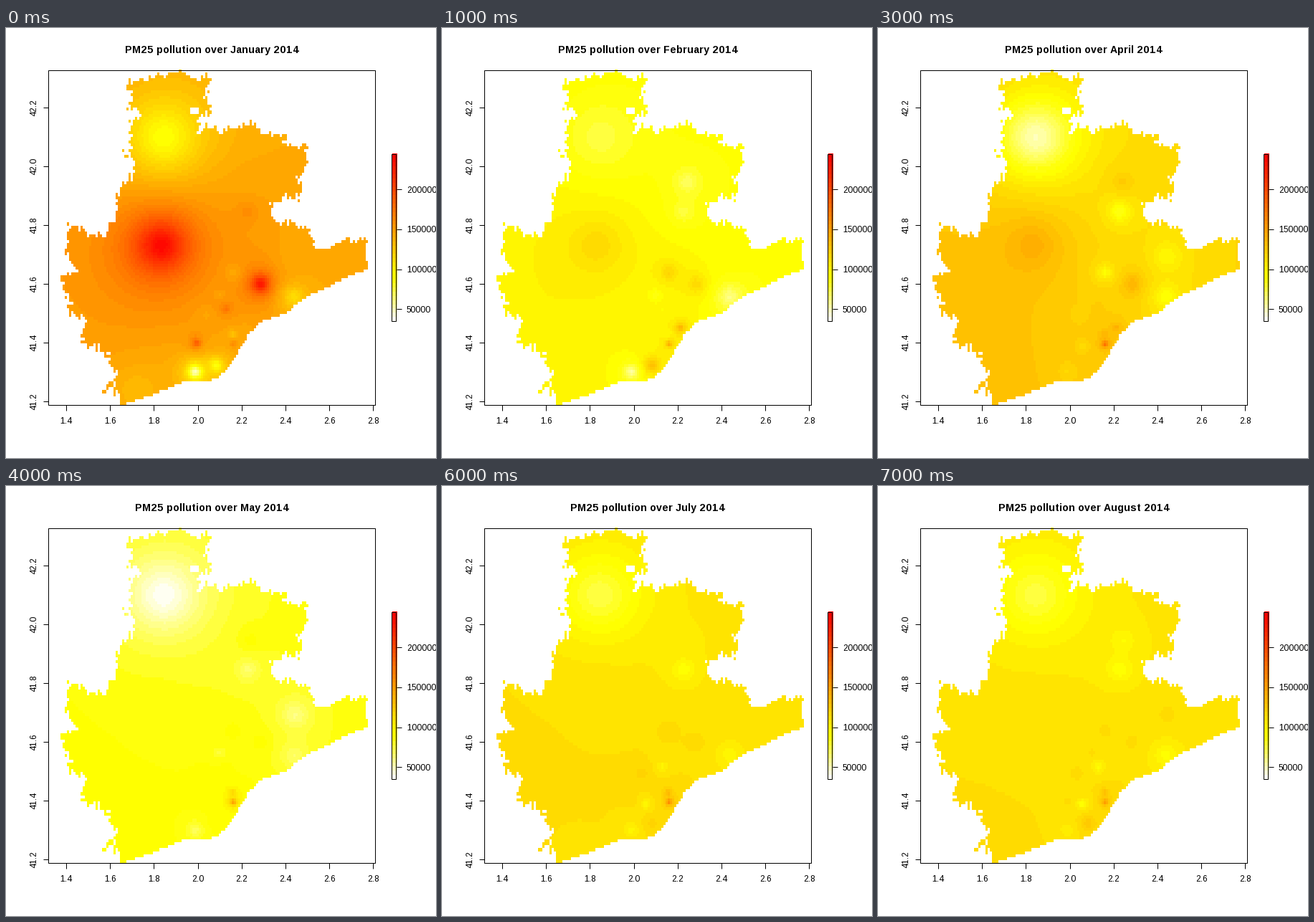
Write a matplotlib script that moves like this. It is 600 px wide and 600 px high and loops after 8000 ms.

```python
import colorsys
import numpy as np
import matplotlib.pyplot as plt
from matplotlib.animation import FuncAnimation
from matplotlib.path import Path
from matplotlib.patches import Rectangle

SIZE = 600
PX = 0.72                             # points per pixel at 100 dpi
LOW, HIGH, LEVELS = 34.7, 244.4, 40   # thousands
COLS, ROWS = 140, 114
LEFT, TOP, CELL_W, CELL_H = 76.35, 59.04, 3.06, 4.1
MONTHS = ["January", "February", "March", "April",
          "May", "June", "July", "August"]

# Key points of the province outline, clockwise, in stage pixels
NORTH = [
    (169, 75), (205, 71), (230, 64), (252, 64), (262, 70), (287, 68),
    (284, 88), (275, 92), (286, 108), (286, 122), (270, 122), (270, 149),
    (278, 137), (300, 145), (337, 136), (346, 133), (358, 149), (390, 148),
    (390, 166), (418, 163), (422, 186), (416, 207), (402, 209), (413, 216),
    (413, 231), (402, 234), (410, 241), (386, 236), (367, 249), (376, 273),
    (403, 273), (424, 283), (431, 309),
]
COAST = [
    (452, 308), (467, 297), (504, 299), (501, 310), (505, 337), (480, 347),
    (425, 373), (385, 401), (355, 411), (340, 426), (312, 473), (296, 488),
    (284, 493), (249, 493), (227, 504), (160, 527),
]
WEST = [
    (158, 510), (137, 505), (137, 497), (154, 499), (152, 483), (145, 472),
    (145, 457), (121, 442), (107, 446), (110, 405), (82, 394), (91, 385),
    (80, 366), (77, 347), (97, 340), (95, 322), (82, 314), (90, 277),
    (106, 279), (110, 288), (143, 287), (154, 262), (154, 241), (138, 241),
    (159, 234), (159, 220), (180, 205), (180, 180), (163, 178), (173, 172),
    (174, 129), (185, 125), (186, 112), (172, 112), (178, 96),
]
GAP = Path([(258, 112), (269, 112), (269, 121), (258, 121)])

SITES = dict(
    north=(220, 153), centre=(217, 304), ridge=(342, 216), valley=(337, 257),
    east=(355, 358), moor=(403, 320), shore=(401, 376), mill=(317, 342),
    park=(307, 392), hill=(298, 373), west=(279, 401), bridge=(266, 440),
    field=(285, 444), port=(317, 441), beach=(333, 419), delta=(264, 480),
    quay=(293, 471), cove=(182, 506), square=(316, 428))

# Background in the west and east, then the sites that stand out from it
READINGS = {
    "January": (146, 141, dict(
        north=88, centre=238, east=230, valley=158, park=172, bridge=190,
        shore=110, delta=46, quay=85, port=160, square=118, cove=130)),
    "February": (96, 90, dict(
        north=74, centre=112, ridge=66, valley=74, mill=114, east=112,
        shore=60, hill=82, beach=135, port=140, delta=55, quay=128)),
    "March": (166, 146, dict(
        north=64, centre=192, valley=100, mill=92, east=180, moor=125,
        shore=108, west=140, field=124, port=206, beach=184)),
    "May": (92, 89, dict(
        north=36, centre=83, valley=64, moor=60, shore=66, hill=74,
        port=152, square=118, delta=68)),
    "June": (119, 113, dict(
        north=68, ridge=128, valley=92, moor=87, hill=98, west=150,
        port=196, square=150, delta=84, quay=88, cove=90)),
    "August": (110, 109, dict(
        north=74, centre=104, valley=87, ridge=92, shore=90, park=90,
        field=86, port=154, square=130, quay=122, delta=98)),
}
BLENDS = {"April": ("March", "May", 0.5), "July": ("June", "August", 0.8)}


def heat_palette(n):
    """White through yellow to red; the lowest quarter fades to white."""
    pale = n // 4
    warm = n - pale
    hues = [colorsys.hsv_to_rgb(k / (warm - 1) / 6, 1, 1) for k in range(warm)]
    fade = np.linspace(1 - 0.5 / pale, 0.5 / pale, pale)
    return np.array((hues + [(1, 1, 1 - s) for s in fade])[::-1])


def province_mask(cells):
    """Cells inside the outline, with a ragged edge everywhere but the coast."""
    rng = np.random.default_rng(4)
    shift_x = np.repeat(rng.choice([-CELL_W, 0, 0, CELL_W], ROWS), COLS)
    shift_y = np.tile(rng.choice([-CELL_H, 0, 0, CELL_H], COLS), ROWS)
    inland = (cells[:, 0] < 155) | (cells[:, 1] < 300)
    ragged = cells + np.column_stack([shift_x, shift_y]) * inland[:, None]
    outline = Path(NORTH + COAST + WEST)
    return outline.contains_points(ragged) & ~GAP.contains_points(cells)


def distances(points, others):
    return np.hypot(*(points[:, None] - others[None]).transpose(2, 0, 1))


PALETTE = heat_palette(LEVELS)
grid_x, grid_y = np.meshgrid(LEFT + CELL_W * (np.arange(COLS) + 0.5),
                             TOP + CELL_H * (np.arange(ROWS) + 0.5))
cells = np.column_stack([grid_x.ravel(), grid_y.ravel()])
inside = province_mask(cells)

# Inverse square weights; a site reaches further when it stands alone
places = np.array(list(SITES.values()), float)
spacing = distances(places, places) + np.diag([np.inf] * len(places))
reach = 0.42 * spacing.min(axis=1)
weights = (reach / np.maximum(distances(cells, places), 0.5)) ** 2
weights /= 1 + weights.sum(axis=1, keepdims=True)


def pollution(month):
    if month in BLENDS:
        a, b, share = BLENDS[month]
        return (1 - share) * pollution(a) + share * pollution(b)
    west, east, readings = READINGS[month]
    ends = [150, 400], [west, east]
    known = np.interp(places[:, 0], *ends)
    excess = [readings.get(name, k) - k for name, k in zip(SITES, known)]
    return np.interp(cells[:, 0], *ends) + weights @ np.array(excess)


def colour_map(month):
    level = (pollution(month) - LOW) / (HIGH - LOW) * LEVELS
    level = np.clip(level.astype(int), 0, LEVELS - 1)
    rgba = np.column_stack([PALETTE[level], inside])
    return rgba.reshape(ROWS, COLS, 4)


plt.rcParams.update({"font.family": "Liberation Sans",
                     "text.hinting_factor": 1})
fig = plt.figure(figsize=(6, 6), dpi=100, facecolor="white")
ax = fig.add_axes([0, 0, 1, 1])
ax.axis("off")


def line(x, y):
    ax.plot(x, y, color="black", lw=PX, solid_capstyle="butt")


def label(x, y, text, px=12, **style):
    return ax.text(x, y, text, fontsize=px * PX, va="baseline",
                   rotation_mode="anchor", **style)


def frame_box(x, y, w, h):
    ax.add_patch(Rectangle((x, y), w, h, fill=False, ec="black", lw=PX, zorder=3))


def picture(data, left, top, width, height):
    return ax.imshow(data, interpolation="nearest", aspect="auto",
                     extent=(left, left + width, top + height, top))


image = picture(colour_map(MONTHS[0]), LEFT, TOP, COLS * CELL_W, ROWS * CELL_H)
picture(PALETTE[::-1, None], 538.5, 176, 6.5, 233.5)
ax.set_xlim(0, SIZE)
ax.set_ylim(SIZE, 0)

frame_box(59, 59, 456, 467)
frame_box(538, 176, 6, 233)
for k in range(8):
    x = 84 + 61.2 * k
    line([x, x], [526, 534])
    label(x, 552, f"{1.4 + 0.2 * k:.1f}", ha="center")
for k in range(6):
    y = 111 + 82.05 * k
    line([52, 59], [y, y])
    label(42, y, f"{42.2 - 0.2 * k:.1f}", ha="center", rotation=90)
for k in range(4):
    y = 392.4 - 55.7 * k
    line([545, 552], [y, y])
    label(559, y + 4.3, str(50000 * (k + 1)), ha="left")
title = label(287.5, 35, "", px=14.4, ha="center", weight="bold")


def update(i):
    month = MONTHS[i % len(MONTHS)]
    image.set_data(colour_map(month))
    title.set_text(f"PM25 pollution over {month} 2014")
    return image, title


anim = FuncAnimation(fig, update, frames=len(MONTHS), interval=1000,
                     repeat=True, repeat_delay=0)
plt.show()
```
